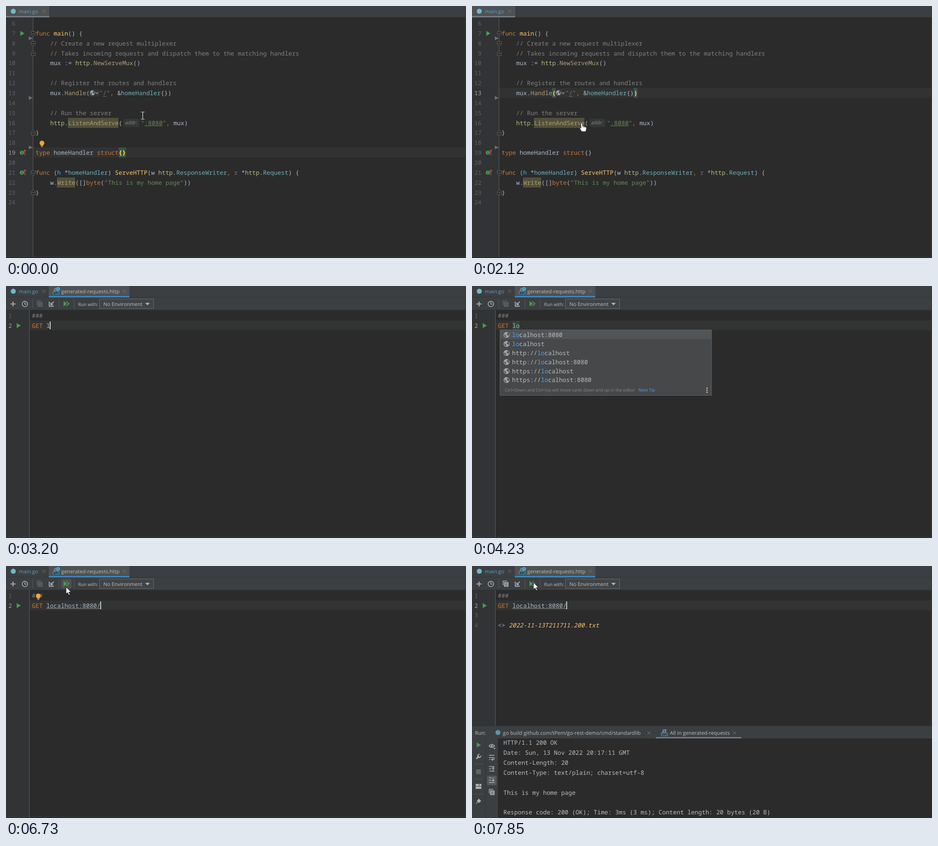
Write an HTML page with a canvas that moves like this. It is 1011 px wide and 554 px high and loops after 8000 ms.

```html
<!DOCTYPE html>
<html lang="en">
<head>
<meta charset="utf-8">
<title>Editor</title>
<style>
html, body { margin: 0; width: 100%; height: 100%; overflow: hidden; background: #2b2b2b; }
canvas { display: block; }
</style>
</head>
<body>
<canvas id="stage" width="1011" height="554"></canvas>
<script>
const ctx = document.getElementById('stage').getContext('2d');
const LOOP = 8000, CHAR = 7.935, ROW = 21.86, CODE_SIZE = CHAR / .6;
const MONO = '"Noto Sans Mono", "DejaVu Sans Mono", monospace';
const SANS = '"Open Sans", "Noto Sans", sans-serif';
const BAR = '#3c3f41', BG = '#2b2b2b', GUTTER = '#313335', ICON = '#afb1b3', GREEN = '#499c54';
const INK = {
  k: '#cc7832', t: '#a9b7c6', c: '#808080', s: '#6a8759', f: '#ffc66d', i: '#ffc66d', m: '#b09d79',
  y: '#6fafbd', p: '#afbf7e', r: '#4eade5', u: '#72737a', h: '#ffef28', l: '#589df6', w: '#bbbbbb'
};

// Code markup: "~" and a letter from INK start each coloured run.
const SOURCE = [
  [7, 65, '~kfunc ~fmain~t() {'],
  [8, 97, '~c// Create a new request multiplexer'],
  [9, 97, '~c// Takes incoming requests and dispatch them to the matching handlers'],
  [10, 97, '~tmux := ~phttp~t.~mNewServeMux~t()'],
  [12, 97, '~c// Register the routes and handlers'],
  [15, 97, '~c// Run the server'],
  [16, 97, '~phttp~t.~mListenAndServe~t('],
  [16, 296.5, '~s":8080"~k, ~tmux)'],
  [17, 65, '~t}'],
  [21, 65, '~kfunc ~t(~rh ~t*~yhomeHandler~t) ~fServeHTTP~t(w ~phttp~t.~yResponseWriter~k, ~ur ~t*~phttp~t.~yRequest~t) {'],
  [22, 97, '~tw.~mWrite~t([]~kbyte~t(~s"This is my home page"~t))'],
  [23, 65, '~t}']
];
const METHODS = ['GET', 'HEAD', 'POST', 'PUT', 'DELETE', 'CONNECT', 'PATCH', 'OPTIONS', 'TRACE'];
const HOSTS = ['localhost:8080', 'localhost', 'http://localhost', 'http://localhost:8080',
  'https://localhost', 'https://localhost:8080'];
const OUTPUT = ['HTTP/1.1 200 OK', 'Date: Sun, 13 Nov 2022 20:17:11 GMT', 'Content-Length: 20',
  'Content-Type: text/plain; charset=utf-8', '', 'This is my home page', '',
  'Response code: 200 (OK); Time: 3ms (3 ms); Content length: 20 bytes (20 B)'];

// Timelines: each entry holds until the next one begins.
const MOUSE = [
  [0, 'beam', 300.5, 241], [100, 'beam', 291, 232], [200, 'beam', 255, 213], [300, 'arrow', 220, 199],
  [410, 'arrow', 201, 192], [1120, 'arrow', 205, 198], [1220, 'arrow', 212, 210], [1320, 'arrow', 222, 225],
  [1410, 'arrow', 231, 239], [1520, 'arrow', 238, 251], [1620, 'arrow', 241, 257], [1910, 'hand', 241, 257],
  [2220, 'arrow', 240, 240], [2310, 'arrow', 237, 212], [2410, 'arrow', 234, 192], [2510, 'arrow', 232, 185],
  [2710, ''], [6220, 'arrow', 190, 74], [6320, 'arrow', 176, 68], [6420, 'arrow', 160, 60],
  [6520, 'arrow', 146, 53], [6630, 'arrow', 136, 48], [6730, 'arrow', 132, 46], [6830, 'arrow', 133, 40],
  [6930, 'arrow', 135, 36]
];
const CARET = [[0, 0], [2710, 1], [4230, 0], [4730, 1], [6220, 0], [6730, 1], [7220, 0], [7720, 1]];
const TYPED = [[0, '/'], [3120, ''], [3200, 'l'], [3500, 'lo'], [4810, 'localhost:8080'], [5110, 'localhost:8080/']];

const at = (list, t) => list.findLast(e => e[0] <= t);

function rect(x, y, w, h, color) {
  ctx.fillStyle = color;
  ctx.fillRect(x, y, w, h);
}
function frame(x, y, w, h, color) {
  ctx.strokeStyle = color;
  ctx.lineWidth = 1;
  ctx.strokeRect(x + .5, y + .5, w - 1, h - 1);
}
function round(x, y, w, h, r, color) {
  ctx.fillStyle = color;
  ctx.beginPath();
  ctx.roundRect(x, y, w, h, r);
  ctx.fill();
}
function disc(x, y, r, color) { round(x - r, y - r, 2 * r, 2 * r, r, color); }
function shape(d, x, y, fill, stroke, width = 1) {
  const path = new Path2D(d);
  ctx.save();
  ctx.translate(x, y);
  if (fill) { ctx.fillStyle = fill; ctx.fill(path); }
  if (stroke) { ctx.strokeStyle = stroke; ctx.lineWidth = width; ctx.stroke(path); }
  ctx.restore();
}
const line = (d, x, y, color = ICON, width = 1.5) => shape(d, x, y, null, color, width);

function label(s, x, y, color = INK.w, size = 11.3, align = 'left') {
  ctx.font = `${size}px ${SANS}`;
  ctx.fillStyle = color;
  ctx.textAlign = align;
  ctx.fillText(s, x, y + size * .36);
}
function code(s, x, y) {
  ctx.textAlign = 'left';
  for (const run of s.split('~').slice(1)) {
    const style = { h: 'bold ', i: 'italic ' }[run[0]] || '';
    ctx.font = `${style}${CODE_SIZE}px ${MONO}`;
    ctx.fillStyle = INK[run[0]];
    ctx.fillText(run.slice(1), x, y + 4.7);
    x += (run.length - 1) * CHAR;
  }
}
function number(n, x, y, current) {
  ctx.font = `12.8px ${MONO}`;
  ctx.fillStyle = current ? '#a4a3a3' : '#606366';
  ctx.textAlign = 'right';
  ctx.fillText(n, x, y + 4.7);
}

const play = (x, y) => shape('M-4-5.5L5 0L-4 5.5Z', x, y, GREEN);
const cross = (x, y) => line('M-3.5-3.5L3.5 3.5M3.5-3.5L-3.5 3.5', x, y, '#75797c', 1);
const dots = (x, y) => [-4.5, 0, 4.5].forEach(d => disc(x, y + d, 1.5, '#c0c2c4'));
const divider = (x, y, w, h) => rect(x, y, w, h, '#55585a');

function globe(x, y, r = 6.5, land = '#46484a') {
  ctx.save();
  ctx.translate(x, y);
  ctx.scale(r / 6.5, r / 6.5);
  disc(0, 0, 6.5, '#a2a5a8');
  shape('M-5-2L-2 1L-1 3L-1 5L-4 3.5ZM-1-5L3-4.5L1-2L0 0L3 0L3.5 3L5 1L5-3L3-5Z', 0, 0, land);
  ctx.restore();
}
function bulb(x, y) {
  disc(x, y - .8, 5.2, '#f2a732');
  rect(x - 2.5, y + 2.5, 5, 2.5, '#f2a732');
  rect(x - 2.5, y + 5.5, 5, 1.2, ICON);
  rect(x - 1.5, y + 7.2, 3, 1, ICON);
}
function api(x, y, clock) {
  shape('M-5 0L-5-3L-2-7L4-7L4 0Z', x, y, '#8b9094');
  line('M-4-3L4-3M0-7L0 0', x, y, BAR, 1);
  rect(x - 7.5, y + .5, 15, 7.5, '#3a7f9b');
  ctx.font = `bold 7px ${SANS}`;
  ctx.fillStyle = '#20292e';
  ctx.textAlign = 'center';
  ctx.fillText('API', x, y + 6.9);
  if (clock) {
    disc(x + 4.5, y - 4.5, 4, '#40b6e0');
    line('M0-2.5L0 .5L2 .5', x + 4, y - 4.5, '#24404c', 1);
  }
}
function copyIcon(x, y, color) {
  line('M-5.5 3L-5.5-6L3-6', x, y, color);
  rect(x - 3.5, y - 3.5, 9.5, 10, color);
  line('M-1.5-1L4-1M-1.5 1.5L4 1.5M-1.5 4L4 4', x, y, BAR, 1);
}

function cursor([, kind, x, y]) {
  if (kind === 'arrow') {
    shape('M0 0L0 15.5L3.6 12.3L6 18L8.6 16.9L6.2 11.4L11 11.2Z', x, y, '#fff', '#111', 1);
  } else if (kind === 'hand') {
    shape('M-1.5 1Q0-1 1.5 1L2 7L9 9Q11 10 10.5 13L9 19L0 19L-4 12Q-5 9-2.5 10L-1.5 12Z', x, y, '#fff', '#222', .8);
    line('M4.5 8L4.5 10.5M7 9L7 11', x, y, '#555', .7);
  } else if (kind === 'beam') {
    line('M-4-8L-1-8L0-7L1-8L4-8M0-7L0 7M-4 8L-1 8L0 7L1 8L4 8', x, y, '#dcdcdc', 1.2);
  }
}

function tabs(second) {
  rect(0, 0, 1011, 24, BAR);
  rect(0, 24, 1011, 1, '#323537');
  const x = second ? 94 : 0, w = second ? 177 : 95;
  rect(x, 0, w, 22, '#4e5254');
  rect(x, 22, w, 3, second ? '#3e86c0' : '#747a80');
  disc(16, 11.5, 5.5, '#6fb8cf');
  label('main.go', 28, 12, '#5f9dc2');
  cross(83, 11.5);
  if (second) {
    api(110, 11, true);
    label('generated-requests.http', 121.5, 12);
    cross(260, 11.5);
  }
}

function fold(y, up) {
  const d = up ? 'M-4.5 5L4.5 5L4.5-2L0-5.5L-4.5-2Z' : 'M-4.5-5L4.5-5L4.5 2L0 5.5L-4.5 2Z';
  shape(d, 60, y, BG, '#606365');
  line('M-2.5 0L2.5 0', 60, y, '#808385', 1);
}

function goFile(t) {
  const rowY = n => 38.3 + (n - 6) * ROW, current = t < 720 ? 19 : 13;
  const band = (n, x, w, color) => rect(x, Math.round(rowY(n) - 11), w, 22, color);
  rect(0, 25, 60, 526, GUTTER);
  band(current, 0, 1009, '#323232');
  rect(59, 25, 1, 526, '#5c5e5f');
  rect(120, 24, 24, 1, '#606366');
  rect(65, 24, 16, 1, '#45484a');
  for (let n = 6; n <= 24; n++) number(n, 20.7, rowY(n), n === current);
  play(35.5, rowY(7));
  for (const n of [19, 21]) {
    disc(35, rowY(n), 4.7, GREEN);
    line('M-1.5-2.5L1.5-2.5M0-2.5L0 2.5M-1.5 2.5L1.5 2.5', 35, rowY(n), '#25402a', 1);
    line('M0 6L0-5M-2.5-3L0-6L2.5-3', 41.5, rowY(n), '#c75450', 1.2);
  }
  for (const y of [71, 202, 311]) shape('M-4-4L5 0L-4 4Z', 54, y, '#6e7072');
  for (const n of [7, 8, 21]) fold(rowY(n) + 1, false);
  for (const n of [9, 17, 23]) fold(rowY(n), true);

  band(16, 136, 111, '#52503a');
  band(22, 112, 40, '#52503a');
  for (const [n, x, s] of SOURCE) code(s, x, rowY(n));
  round(258, 248, 35, 18, 4, '#343637');
  label('addr:', 262, 256.5, '#87898b', 10.6);
  rect(304.5, 263, 39.5, 1, INK.s);

  const y = rowY(13), on = current === 13, pair = on ? '~h' : '~t';
  if (on) for (const x of [176, 355.5]) band(13, x, 8, '#3b514d');
  round(184, y - 8, 21, 16, 4, t >= 300 && t < 1120 ? '#43474a' : '#333536');
  code(`~tmux.~mHandle${pair}(`, 97, y);
  globe(190, y - .5, 5.5, '#35383a');
  line('M-3-1.5L0 1.5L3-1.5', 200, y, '#9a9da0', 1.3);
  code(`~s"/"~k, ~t&~yhomeHandler~t{}${pair})`, 205, y);
  rect(213, 198, 8, 1, INK.s);

  if (!on) {
    band(19, 247.5, 16, '#3b514d');
    bulb(79, 302);
  }
  code(`~ktype ~thomeHandler ~kstruct${on ? '~t' : '~h'}{}`, 65, rowY(19));
}

function actions(t) {
  const chosen = t < 1520 ? 0 : 1;
  rect(200, 191, 226, 94, BAR);
  rect(200, 191, 226, 25, '#4b4f52');
  rect(200, 216, 226, 1, '#5a5d5f');
  frame(200, 191, 226, 94, '#646769');
  rect(200, 220 + chosen * 20, 225, 19.5, '#4b6eaf');
  label('Actions for URL', 313.3, 204, INK.w, 11.3, 'center');
  globe(221, 230, 6.5, chosen ? BAR : '#4b6eaf');
  api(221, 250, false);
  line('M-5 4L-2-4L2 3L5-3', 221, 270, ICON, 1);
  for (const [x, y] of [[-5, 4], [-2, -4], [2, 4], [5, -4], [5, 4]]) disc(221 + x, 270 + y, 1.8, ICON);
  ['Go to declaration or usages', 'Generate request in HTTP Client', 'Show all endpoints of module']
    .forEach((s, i) => label(s, 234.5, 230 + i * 20, INK.w, 11.2));
}

function toolbar(t) {
  rect(0, 25, 1011, 28, BAR);
  rect(0, 52, 1011, 1, '#323537');
  line('M-5.5 0L5.5 0M0-5.5L0 5.5', 15.5, 39.5, ICON, 2);
  line('M6 0A6 6 0 1 1-6 0A6 6 0 1 1 6 0M0-4L0 .5L3 .5', 41.5, 39.5, ICON, 1.6);
  copyIcon(74, 39, t >= 3120 && t < 7220 ? '#626567' : ICON);
  line('M-5-5L-5 5L5 5M5-5L-1 1M-1.5-3L-1.5 1.5L3 1.5', 100, 39.5, ICON, 1.8);
  for (const x of [58, 116, 149]) divider(x, 29, 1, 20);
  if (t >= 6630 && t < 7420) round(121, 28, 23, 22, 3, t >= 7220 ? '#5c6164' : '#4c5052');
  shape('M-6.5-6L1 0L-6.5 6Z', 133, 39, GREEN);
  line('M-.5-5L5.5 0L-.5 5', 133, 39, GREEN, 1.8);
  label('Run with:', 158.5, 40, INK.w, 10);
  rect(205, 28, 120, 22, '#414446');
  frame(205, 28, 120, 22, '#66696b');
  label('No Environment', 214, 39.5);
  shape('M-5-2.5L5-2.5L0 3Z', 311, 39.5, ICON);
}

function popup(x, y, w, h, highlight) {
  rect(x, y, w, h, '#46484a');
  rect(x + 1, y + 1, w - 2, 19.5, highlight);
  frame(x, y, w, h, '#5d6062');
  dots(x + w - 10.5, y + h - 12);
}

function httpFile(t) {
  const typed = at(TYPED, t)[1], x = 57, hostX = x + 4 * CHAR;
  const done = t >= 7720, hinting = t >= 3400 && t < 4810;
  rect(0, 53, 51, 501, GUTTER);
  rect(0, 76, 1009, 21, '#323433');
  rect(51, 53, 1, 501, '#5c5e5f');
  for (let n = 1; n <= (done ? 4 : 2); n++) number(n, 13.3, 65 + (n - 1) * ROW, n === 2);
  code('~c###', x, 65);
  if (t < 2710) {
    rect(x, 76, 32.5, 21, '#214283');
    frame(x, 76, 32.5, 21, '#a4aeba');
  }
  if (hinting) rect(hostX, 77, typed.length * CHAR, 19, '#364538');
  code('~kGET ~t' + typed, x, 87);
  if (t >= 3200) play(27.5, 87);
  if (t >= 4810) rect(hostX, 93, (t < 5640 ? 14 : 15) * CHAR, 1, '#87918f');
  if (at(CARET, t)[1]) rect(hostX + (t < 3120 ? 0 : typed.length) * CHAR - .7, 78, 2, 17, '#d0d0d0');
  if (t >= 6220 && t < 7220) bulb(71, 66.5);
  if (done) code('~t<> ~i2022-11-13T211711.200.txt', x, 65 + 3 * ROW);

  if (t >= 2510 && t < 2710) {
    popup(51, 96, 232, 204, '#113a5c');
    METHODS.forEach((s, i) => code('~w' + s, 56.5, 107.5 + i * 19.85));
    label('Press Enter or Tab to replace', 61, 288.5, '#85888a', 9.45);
  }
  if (hinting) {
    popup(61, 96, 466, 145, '#525558');
    HOSTS.forEach((s, i) => {
      const y = 107.5 + i * 19.85, start = s.indexOf('lo'), end = start + typed.length;
      globe(76, y);
      code(`~w${s.slice(0, start)}~l${typed}~w${s.slice(end)}`, 88, y);
    });
    label('Ctrl+Down and Ctrl+Up will move caret down and up in the editor', 72, 229, '#85888a', 9.45);
    label('Next Tip', 366, 229, INK.l, 9.45);
  }
}

function runPanel(t) {
  rect(0, 352, 1011, 202, BG);
  rect(0, 352, 1011, 27, BAR);
  rect(0, 351, 1011, 1, '#323537');
  rect(0, 379, 57, 175, BAR);
  rect(29, 379, 1, 175, '#323537');
  rect(404, 376, 188, 3, '#747a80');
  label('Run:', 6.5, 367);
  disc(57, 366, 5.5, '#5f93a5');
  label('go build github.com/tPem/go-rest-demo/cmd/standardlib', 68, 367);
  cross(389, 367);
  api(423, 366, false);
  label('All in generated-requests', 435, 367);
  cross(577, 367);

  play(14.5, 393.5);
  line('M-5 5L1-1', 14.5, 419, ICON, 3);
  line('M5-3A3.5 3.5 0 1 1 2-6', 14.5, 420, ICON, 2);
  rect(9, 447, 10.5, 10.5, '#626567');
  for (const [x, y, w, h] of [[8, 479, 7, 5], [16, 479, 4.5, 5], [8, 485, 12.5, 5]]) rect(x, y, w, h, ICON);
  shape('M0-6L6 0L3.5 1L1 4L-1 2L-5 6L-6 5L-2 1L-4-1L-1-3.5Z', 14.5, 517, ICON);
  for (const y of [435, 468, 501]) divider(5, y, 19, 1);

  round(33, 461, 21, 21, 3, '#55595c');
  line('M-6 0Q0-7 6 0Q0 7-6 0Z', 43.5, 395.5, ICON, 1.5);
  disc(43.5, 395.5, 2, ICON);
  shape('M-2 0L3 0L.5 3Z', 49, 400, ICON);
  line('M-6-5L6-5M-6 0L4 0Q7 2 4 4.5L0 4.5M-6 4.5L-3 4.5M2 2L-.5 4.5L2 7', 43.5, 421, ICON, 1.5);
  line('M-6-5L6-5M-6 5L6 5M-6 0L-1 0M3 4L3-3M.5-.5L3-3L5.5-.5', 43.5, 446, ICON, 1.5);
  line('M-6-5L-1-5M-6 0L-1 0M-6 5L6 5M3-6L3 2M.5-.5L3 2L5.5-.5', 43.5, 471, ICON, 1.5);
  copyIcon(43.5, 497, ICON);
  if (t >= 7620) OUTPUT.forEach((s, i) => code('~w' + s, 69, 388.6 + i * ROW));
}

function draw() {
  const t = performance.now() % LOOP, second = t >= 2310;
  ctx.textRendering = 'geometricPrecision';
  rect(0, 0, 1011, 554, BG);
  if (second) {
    httpFile(t);
    toolbar(t);
  } else {
    goFile(t);
  }
  tabs(second);
  rect(1009, 25, 1, 529, '#3a3c3d');
  rect(0, 551, 1011, 1, '#3a3a3b');
  if (t >= 820 && t < 2120) actions(t);
  if (t >= 7420) runPanel(t);
  cursor(at(MOUSE, t));
  requestAnimationFrame(draw);
}
draw();
</script>
</body>
</html>
```
